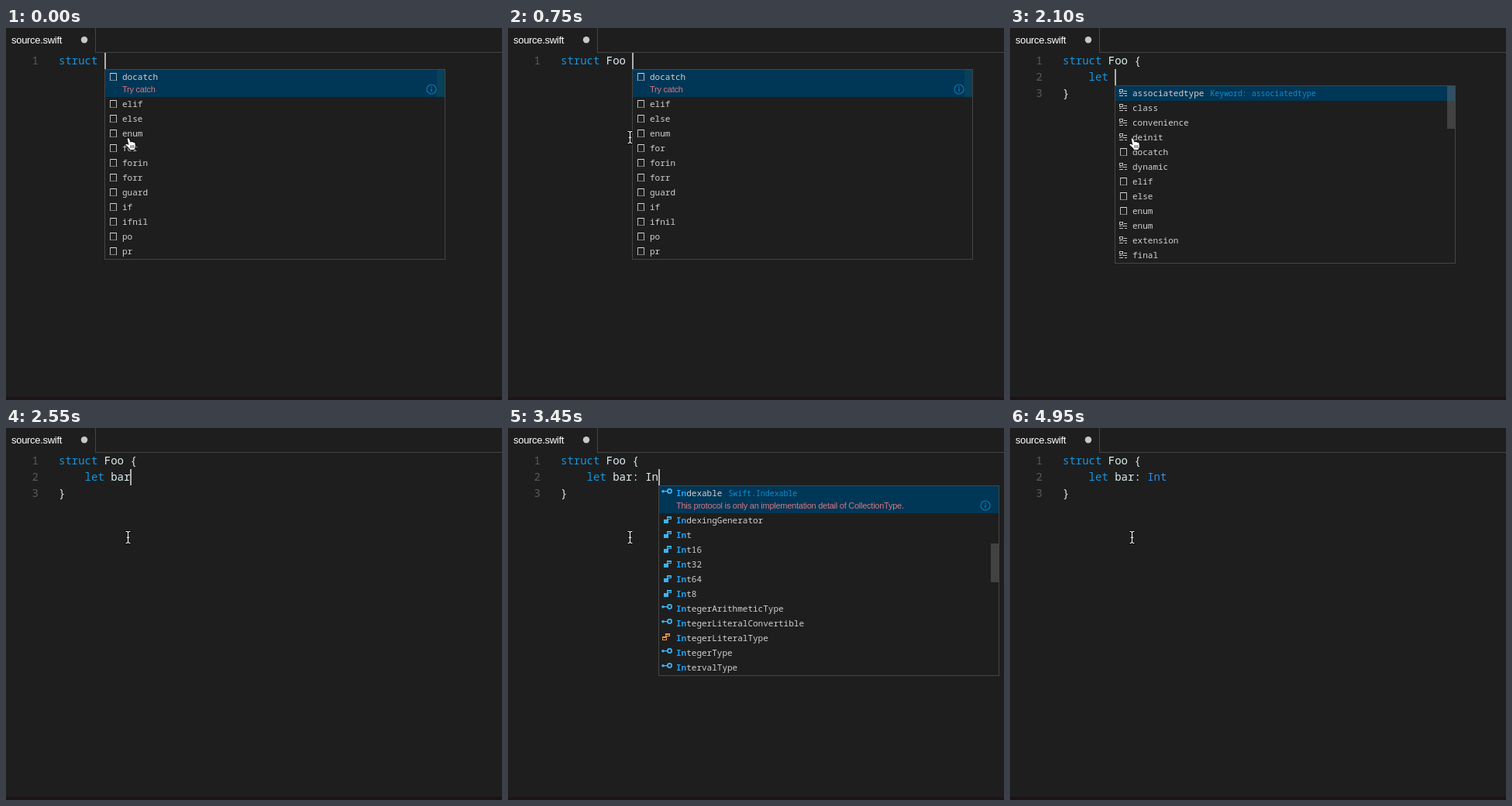
Animation, 640 px wide and 480 px high, one loop 5.1 s. Source, as an HTML page with a canvas:

```html
<!DOCTYPE html>
<html lang="en">
<head>
<meta charset="utf-8">
<title>Code completion</title>
<style>
  html, body { margin: 0; width: 100%; height: 100%; overflow: hidden; background: #1e1e1e; }
  canvas { display: block; }
</style>
</head>
<body>
<canvas id="stage" width="640" height="480"></canvas>
<script>
const ctx = document.getElementById('stage').getContext('2d');
const LOOP = 5100, CHAR = 8.4, LINE = 21, ROW = 19;
const MONO = '"Noto Sans Mono", "DejaVu Sans Mono", monospace';
const SANS = '"Liberation Sans", Arial, sans-serif';
const BLUE = '#3cb4f4', ORANGE = '#e8964a';
const MOUSE = { x: 157, y: 141 };

// Each entry: icon kind, then name. s snippet, k keyword, p protocol, c alias, t struct
const list = (text, extra) => ({
  items: text.split(' ').map(w => ({ kind: w[0], name: w.slice(2) })),
  sel: 0, hit: 0, thumb: null, detail: '', doc: '', ...extra
});

const snippets = list('s:docatch s:elif s:else s:enum s:for s:forin s:forr s:guard s:if s:ifnil s:po s:pr',
  { doc: 'Try catch', thumb: [0, 35], faint: true });
const loops = hit => list('s:for s:forin s:forr', { hit });
const keywords = list('k:associatedtype k:class k:convenience k:deinit s:docatch k:dynamic s:elif s:else s:enum k:enum k:extension k:final',
  { detail: 'Keyword: associatedtype', thumb: [0, 55] });
const letWord = hit => list('k:let', { hit, detail: 'Keyword: let' });
const types = list('p:AbsoluteValuable c:Any t:AnyBidirectionalCollection t:AnyBidirectionalIndex c:AnyClass p:AnyCollectionType ' +
  't:AnyForwardCollection t:AnyForwardIndex t:AnyGenerator p:AnyObject t:AnyRandomAccessCollection t:AnyRandomAccessIndex',
  { detail: 'Swift.AbsoluteValuable', doc: 'A type that supports an "absolute value" function.', thumb: [0, 20] });
const ints = (hit, sel, detail, doc) => list('p:Indexable t:IndexingGenerator t:Int t:Int16 t:Int32 t:Int64 t:Int8 ' +
  'p:IntegerArithmeticType p:IntegerLiteralConvertible c:IntegerLiteralType p:IntegerType p:IntervalType',
  { hit, sel, detail, doc, thumb: [74, 50] });
const indexable = hit => ints(hit, 0, 'Swift.Indexable', 'This protocol is only an implementation detail of CollectionType.');
const generator = ints(2, 1, 'Swift.IndexingGenerator',
  'A generator for an arbitrary collection. Provided C conforms to the other requiremen...');
const integer = ints(2, 2, 'Swift.Int', 'A 64-bit signed integer value type.');

// "|" marks the text caret.
const body = line => `struct Foo {\n    ${line}\n}`;
const steps = [
  [0, 'struct |', snippets],
  [150, 'struct F|', loops(1)],
  [300, 'struct Fo|', loops(2)],
  [450, 'struct Foo|'],
  [750, 'struct Foo |', snippets],
  [900, 'struct Foo {|}', snippets],
  [1200, 'struct Foo {|}'],
  [1500, body('|')],
  [1650, body('l|'), letWord(1)],
  [1800, body('le|'), letWord(2)],
  [1950, body('let|'), letWord(3)],
  [2100, body('let |'), keywords],
  [2250, body('let b|')],
  [2400, body('let ba|')],
  [2550, body('let bar|')],
  [2700, body('let bar:|')],
  [2850, body('let bar: |')],
  [3000, body('let bar: |'), types],
  [3300, body('let bar: I|'), indexable(1)],
  [3450, body('let bar: In|'), indexable(2)],
  [4050, body('let bar: In|'), generator],
  [4200, body('let bar: In|'), integer],
  [4350, body('let bar: Int|')],
  [4800, body('let bar: Int')]
];

function rect(x, y, w, h, color) {
  ctx.fillStyle = color;
  ctx.fillRect(x, y, w, h);
}

function frame(x, y, w, h, color) {
  ctx.strokeStyle = color;
  ctx.lineWidth = 1;
  ctx.strokeRect(x + .5, y + .5, w - 1, h - 1);
}

function circle(x, y, r) {
  ctx.beginPath();
  ctx.arc(x, y, r, 0, 7);
}

// Draws text on its baseline and returns the x where it ends.
function text(str, x, y, font, color, spacing = 0) {
  ctx.font = font;
  ctx.letterSpacing = spacing + 'px';
  ctx.fillStyle = color;
  ctx.fillText(str, x, y);
  return x + ctx.measureText(str).width;
}

function chrome() {
  rect(0, 0, 640, 480, '#1e1e1e');
  rect(115, 0, 1, 32, '#444');
  rect(115, 31, 525, 1, '#444');
  rect(0, 476, 640, 4, '#1d1318');
  text('source.swift', 7, 20, '13px ' + SANS, '#fff', -.3);
  ctx.fillStyle = '#c8c8c8';
  circle(101, 15.3, 4.2);
  ctx.fill();
}

function code(lines, caret) {
  const font = '14px ' + MONO;
  lines.forEach((line, i) => {
    const y = 47 + i * LINE;
    text(String(i + 1), 33.6, y, font, '#5a5a5a');
    let col = 0;
    for (const part of line.split(/(struct|let|Int)/)) {
      const color = part === 'Int' ? '#2b8ff5' : /^(struct|let)$/.test(part) ? '#1296e0' : '#dfeef0';
      text(part, 68 + col * CHAR, y, font, color);
      col += part.length;
    }
  });
  if (!caret) return;
  if (lines[0].endsWith('{}')) {
    frame(160, 32, 9, 21, '#888');
    frame(168, 32, 9, 21, '#888');
  }
  rect(caret.x, caret.y, 2, LINE, '#aeafad');
}

const icons = {
  s(x, y) {
    rect(x + 7, y + 5, 9, 1, '#d8d8d8');
    rect(x + 7, y + 5, 1, 9, '#b8b8b8');
    rect(x + 15, y + 5, 1, 9, '#b8b8b8');
    for (let i = 0; i < 9; i += 2) rect(x + 7 + i, y + 14, 1, 1, '#d8d8d8');
  },
  k(x, y) {
    frame(x + 6, y + 5, 5, 4, '#c5c5c5');
    for (const [dx, dy, w] of [[12, 7, 4], [6, 10, 3], [10, 10, 6], [6, 13, 5], [13, 13, 3]])
      rect(x + dx, y + dy, w, 1, '#c5c5c5');
  },
  p(x, y) {
    rect(x + 5, y + 7, 8, 1.3, BLUE);
    circle(x + 6, y + 7.7, 1.8);
    ctx.fill();
    ctx.strokeStyle = BLUE;
    ctx.lineWidth = 1.7;
    circle(x + 14.5, y + 7.5, 2.6);
    ctx.stroke();
  },
  c(x, y) { boxes(x + 5, y + 4, ORANGE); },
  t(x, y) {
    boxes(x + 7, y + 5, BLUE);
    rect(x + 7, y + 11, 6, 2, BLUE);
  }
};

function boxes(x, y, color) {
  frame(x + 4, y, 6, 4, color);
  rect(x + 4, y, 6, 2, color);
  frame(x, y + 4, 6, 5, color);
  rect(x, y + 4, 6, 2, color);
}

function infoIcon(x, y) {
  ctx.strokeStyle = '#0878b4';
  ctx.lineWidth = 1.2;
  circle(x, y, 6);
  ctx.stroke();
  rect(x - .7, y - 3.5, 1.4, 1.5, '#0878b4');
  rect(x - .7, y - 1, 1.4, 4.5, '#0878b4');
}

function popup(p, x, y) {
  const height = p.items.length * ROW + (p.doc ? 16 : 0) + 2;
  rect(x, y, 440, height, '#1e1e1e');
  let top = y + 1;
  p.items.forEach((item, i) => {
    const chosen = i === p.sel;
    const rowHeight = chosen && p.doc ? 35 : ROW;
    if (chosen) rect(x + 1, top, 438, rowHeight, '#003656');
    icons[item.kind](x, top - 1);
    const base = top + 13;
    const start = text(item.name.slice(0, p.hit), x + 23, base, 'bold 11px ' + MONO, '#16a2f5');
    const end = text(item.name.slice(p.hit), start, base, '11px ' + MONO, '#d0d0d0');
    if (chosen) {
      text(p.detail, end + 8, base, '9.9px ' + MONO, '#0a8fd0');
      if (p.doc) {
        text(p.doc, x + 23, top + 29, '11px ' + SANS, '#d6777f', -.25);
        infoIcon(x + 422, top + 25);
      }
    }
    top += rowHeight;
  });
  if (p.thumb) rect(x + 429, y + 1 + p.thumb[0], 10, p.thumb[1], p.faint ? 'rgba(40,110,100,.2)' : 'rgba(121,121,121,.4)');
  frame(x, y, 440, height, '#454545');
  return MOUSE.x >= x && MOUSE.y < y + height;
}

function outlined(path, x, y) {
  ctx.save();
  ctx.translate(x, y);
  ctx.lineJoin = 'round';
  ctx.strokeStyle = '#000';
  ctx.lineWidth = 1.6;
  ctx.stroke(path);
  ctx.fillStyle = '#fff';
  ctx.fill(path);
  ctx.restore();
}

const hand = new Path2D('M0 1Q1-.5 2.5 1L4 5.5Q5 4 6 5.5Q7 4.5 8 6Q9.5 5 10 7L10.5 11L9 15H3.5L2 12.5L-2 9Q-2.5 7 0 8L2 9Z');
const beam = new Path2D('M-3-8H-1L0-7L1-8H3V-7H1.5L.6-6V6L1.5 7H3V8H1L0 7L-1 8H-3V7H-1.5L-.6 6V-6L-1.5-7H-3Z M-2-.2H2V.8H-2Z');

function pointer(overList) {
  if (!overList) return outlined(beam, MOUSE.x + .5, MOUSE.y);
  outlined(hand, MOUSE.x - .5, MOUSE.y + 1);
  for (const dx of [4, 6, 8]) rect(MOUSE.x + dx - .5, 151, .8, 4, '#333');
}

function draw(now) {
  const t = now % LOOP;
  const [, source, menu] = steps.findLast(s => s[0] <= t) || steps[0];
  const before = source.split('|')[0].split('\n');
  const caret = source.includes('|') && {
    x: Math.round(68 + before.at(-1).length * CHAR),
    y: 32 + (before.length - 1) * LINE
  };
  chrome();
  code(source.replace('|', '').split('\n'), caret);
  pointer(menu ? popup(menu, caret.x, caret.y + LINE) : false);
}

const begin = performance.now();
function tick() {
  draw(performance.now() - begin);
  requestAnimationFrame(tick);
}
tick();
</script>
</body>
</html>
```
